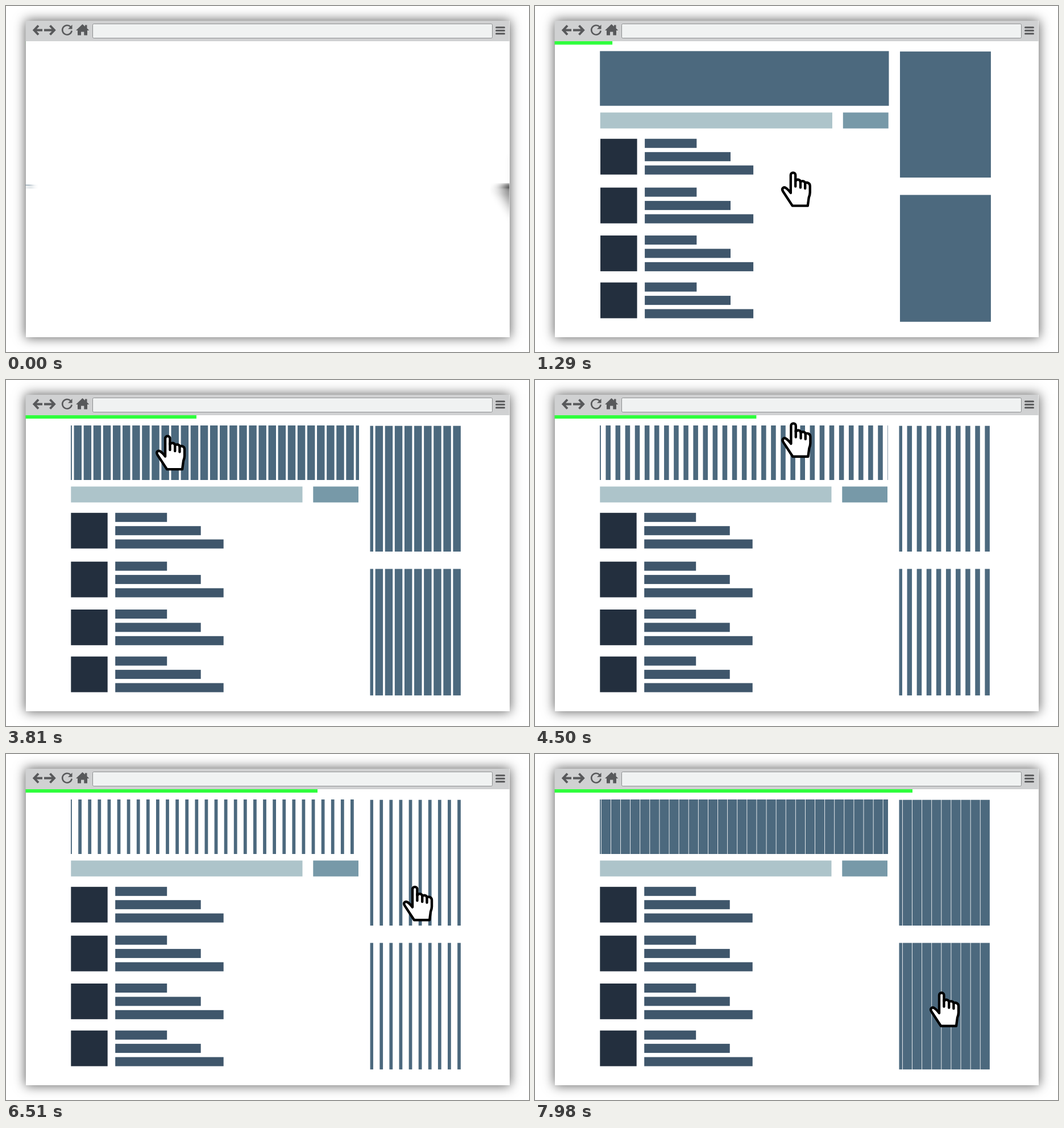
Animation, 920 px wide and 609 px high, one loop 8 s. Source, as an HTML page:

```html
<!DOCTYPE html>
<html lang="en">
<head>
<meta charset="utf-8">
<title>Page loading</title>
<style>
  html, body { margin: 0; width: 100%; height: 100%; overflow: hidden; background: #fff; }
  .stage { position: relative; width: 920px; height: 609px; overflow: hidden; }
  .window { position: absolute; left: 34.5px; top: 26px; width: 851px; height: 557px; background: #fff;
    box-shadow: 0 0 19px 1px rgba(0, 0, 0, .62); }
  svg { position: absolute; left: 0; top: 0; }
  #bar { transform-origin: 34.5px 0; animation: load 8s linear infinite; }
  @keyframes load { from { transform: scaleX(0); } }
</style>
</head>
<body>
<div class="stage">
  <div class="window"></div>
  <svg width="920" height="609" viewBox="0 0 920 609">
    <defs>
      <clipPath id="view"><rect x="34.5" y="62" width="851" height="521"/></clipPath>
      <filter id="soft" filterUnits="userSpaceOnUse" x="-100" y="0" width="1200" height="700" color-interpolation-filters="sRGB">
        <feGaussianBlur id="softBlur" stdDeviation="0 0"/>
      </filter>
      <filter id="smear" x="-30%" y="-10%" width="160%" height="120%" color-interpolation-filters="sRGB">
        <feGaussianBlur id="smearBlur" stdDeviation="0 0"/>
      </filter>
    </defs>

    <rect x="34.5" y="26" width="851" height="36" fill="#d0d1d2"/>
    <rect x="152.5" y="31.5" width="703" height="25" rx="2" fill="#f0f2f2" stroke="#8d8f91"/>
    <g fill="none" stroke="#58595b" stroke-width="4">
      <path d="M57 34.5L49.5 42.5L57 50.5M50 42.5H64M77.500 34.500L85 42.500L77.500 50.500M84 42.500H67"/>
      <path d="M113.600 36.600A8.300 8.300 0 1 0 115.700 43.500" stroke-width="2.500"/>
      <path d="M862.500 37.800H876.500M862.500 43.300H876.500M862.500 48.800H876.500" stroke-width="3" stroke-linecap="round"/>
    </g>
    <g fill="#58595b">
      <path d="M116.500 33V40.500H109Z"/>
      <path d="M134.500 32L139 36V33.500H142.500V39.200L146.300 43H143V51.500H137.300V45.500H132V51.500H126V43H123Z"/>
    </g>

    <g clip-path="url(#view)">
      <g id="page">
        <g id="blocks"></g>
        <path id="gaps" d="M98.800 318H800" stroke="#fff" stroke-width="480" fill="none"/>
        <g id="rows"></g>
      </g>
      <g id="cursor" fill="#fff" stroke="#000" stroke-width="4.400" stroke-linejoin="round" stroke-linecap="round">
        <g transform="translate(-459 -322.500)">
          <path d="M449.500 329V297.500a4.200 4.200 0 0 1 8.400 0V308c3-4 8-3 8.800 1.500c3-2.500 7.500-1.500 8.200 2.200c3-2 8.600-.5 8.600 5V328q0 4-2 9L479.500 351.700H452.500L436 326.500c-3.500-5.500 1-8.500 4.500-6.500q4 2.500 9 9z"/>
          <path d="M457.900 306V317.500M466.700 309.500V319.500M474.900 312V321" fill="none"/>
        </g>
      </g>
    </g>
    <rect id="bar" x="34.5" y="62" width="631" height="6" fill="#2fff3d"/>
  </svg>
</div>
<script>
const LOOP = 8000, PITCH = 17.1;
const $ = id => document.getElementById(id);
const groups = [];

function make(name, parent, attrs) {
  const el = document.createElementNS('http://www.w3.org/2000/svg', name);
  for (const key in attrs) el.setAttribute(key, attrs[key]);
  return parent.appendChild(el);
}
const box = (parent, fill, x, y, width, height) => make('rect', parent, { x, y, width, height, fill });

function addGroup(parent, cx, cy) {
  const el = make('g', parent, {});
  groups.push({ el, cx, cy });
  return el;
}

const blocks = addGroup($('blocks'), 457, 318);
box(blocks, '#4c697e', 114, 80, 507, 96);
box(blocks, '#4c697e', 640.5, 80.7, 159.5, 221.3);
box(blocks, '#4c697e', 640.5, 332.5, 159.5, 222.7);

const search = addGroup($('rows'), 367, 201.5);
box(search, '#adc4ca', 114.3, 187.5, 407.2, 28);
box(search, '#7799a8', 540.3, 187.5, 79.7, 28);

for (const top of [233.8, 319.7, 404, 486.7]) {
  const row = addGroup($('rows'), 248.3, top + 31.4);
  box(row, '#232f3e', 114.3, top, 64.4, 62.8);
  [91, 150.5, 190.5].forEach((w, i) => box(row, '#3f566b', 192.2, top + i * 23.4, w, 16));
}

// Damped wobble: -1 at the start, 0 at rest.
function wobble(t) {
  if (t >= 1620) return 0;
  const size = 0.1326 * (1 - t / 1620) + 0.8674 * Math.exp(-t / 60);
  return -size * Math.cos(Math.PI * t / 236);
}

// Cursor stops: time, x, y
const stops = [[2340, 460.5, 322.5], [3810, 289.5, 128], [5220, 671, 125], [6510, 724.5, 263], [7980, 720.5, 449.5]];

function slope(i, axis) {
  const a = stops[i - 1], b = stops[i + 1];
  return a && b ? (b[axis] - a[axis]) / (b[0] - a[0]) : 0;
}

function cursorAt(t, axis) {
  const last = stops.length - 1;
  if (t <= stops[0][0]) return stops[0][axis];
  if (t >= stops[last][0]) return stops[last][axis];
  const i = stops.findIndex(s => s[0] > t) - 1;
  const a = stops[i], b = stops[i + 1], span = b[0] - a[0];
  const u = (t - a[0]) / span, u2 = u * u, u3 = u2 * u;
  return (2 * u3 - 3 * u2 + 1) * a[axis] + (u3 - 2 * u2 + u) * span * slope(i, axis)
    + (3 * u2 - 2 * u3) * b[axis] + (u3 - u2) * span * slope(i + 1, axis);
}

function setBlur(el, filter, blur, amount) {
  if (amount > 0.15) {
    blur.setAttribute('stdDeviation', `${Math.min(amount, 6)} 0`);
    el.setAttribute('filter', `url(#${filter})`);
  } else el.removeAttribute('filter');
}

function draw(t) {
  const d = wobble(t);
  for (const { el, cx, cy } of groups)
    el.setAttribute('transform', `translate(${cx + 425 * d} ${cy}) scale(${1 + d}) translate(${-cx} ${-cy})`);
  $('cursor').setAttribute('transform',
    `translate(${cursorAt(t, 1) - 480 * d} ${cursorAt(t, 2)}) scale(${1 - 1.1 * d})`);
  setBlur($('page'), 'soft', $('softBlur'), 12 * Math.abs(d));
  setBlur($('cursor'), 'smear', $('smearBlur'), 24 * Math.abs(d));

  // Blinds close by 5700 ms, then open again.
  const gap = PITCH * Math.max(0, 1 - Math.abs(t - 5700) / 2400);
  $('gaps').style.display = gap > 0 ? '' : 'none';
  $('gaps').setAttribute('stroke-dasharray', `${gap} ${PITCH - gap}`);
}

const bar = $('bar').getAnimations()[0];
const start = performance.now();
function tick() {
  const t = (performance.now() - start) % LOOP;
  if (bar) bar.currentTime = t;
  draw(t);
  requestAnimationFrame(tick);
}
tick();
</script>
</body>
</html>
```
